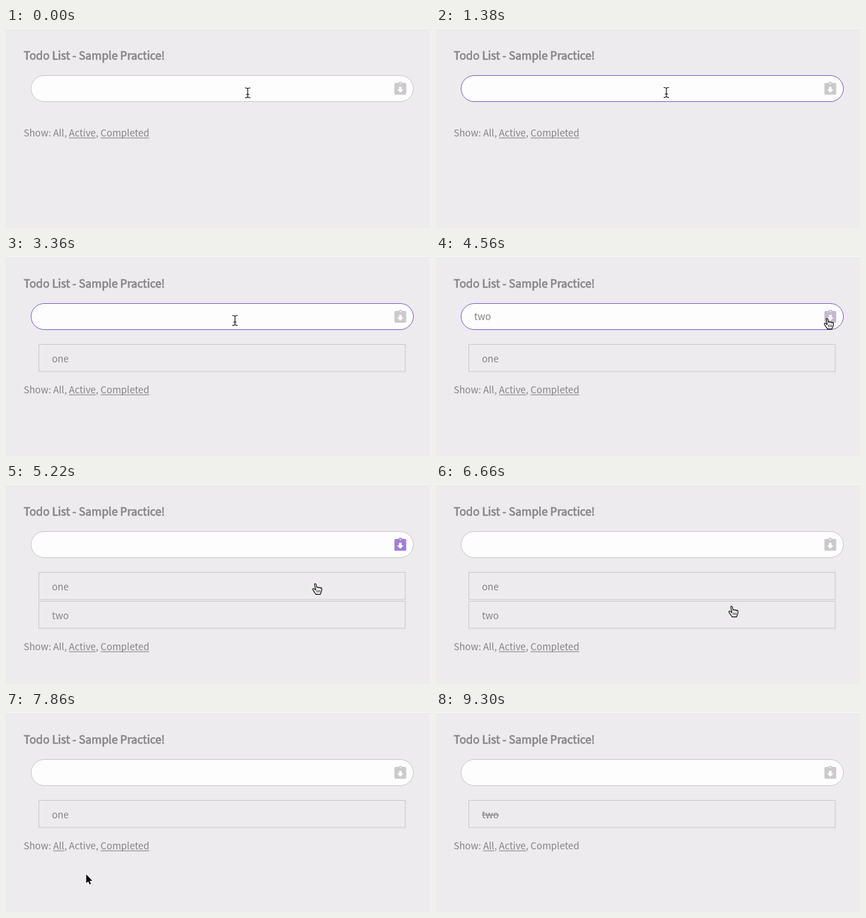
Recreate the animation shown at these times as an HTML page with a canvas. Size 600 px wide and 284 px high, loop 9660 ms.

```html
<!DOCTYPE html>
<html lang="en">
<head>
<meta charset="utf-8">
<title>Todo List</title>
<style>
  html, body { margin: 0; width: 100%; height: 100%; overflow: hidden; background: #edebee; }
  canvas { display: block; width: 600px; height: 284px; }
</style>
</head>
<body>
<canvas id="stage" role="img" aria-label="Todo list demo"></canvas>
<script>
const LOOP = 9660, STEP = 60;
const canvas = document.getElementById('stage');
const ctx = canvas.getContext('2d');
const ratio = window.devicePixelRatio || 1;
canvas.width = 600 * ratio;
canvas.height = 284 * ratio;

const FAMILY = '"Noto Sans CJK SC", "Noto Sans CJK JP", "Noto Sans CJK", "Noto Sans", sans-serif';
const BODY = '13.4px ' + FAMILY;
const TITLE = '15.55px ' + FAMILY;
const INK = '#858385', LINE = [203, 201, 204], PURPLE = [138, 100, 200];
const ICON_OFF = [203, 201, 205], ICON_ON = [160, 128, 210];
const ROW = 41;

const iconPath = new Path2D('M19 3h-4.18C14.4 1.84 13.3 1 12 1c-1.3 0-2.4.84-2.82 2H5c-1.1 0-2 .9-2 2v14c0 1.1.9 2 2 2h14c1.1 0 2-.9 2-2V5c0-1.1-.9-2-2-2zm-7 0c.55 0 1 .45 1 1s-.45 1-1 1-1-.45-1-1 .45-1 1-1zm0 15l-5-5h3V9h4v4h3l-5 5z');
const arrowPath = new Path2D('M0 0V12.6L2.9 10L4.7 14.3L6.7 13.4L4.9 9.3H8.7Z');
const handPath = new Path2D('M4.4 9.6L3 8.2C1.8 7 .2 7.5 .6 8.8C1 10 2.2 11.2 2.9 12.6C3.6 13.8 4.7 14.2 4.7 15.6H11.4C11.5 14 13.3 12.2 13.3 9.6V7.6C13.3 6.1 11.4 6.1 11.2 7.1C11 5.6 9 5.5 8.8 6.5C8.5 5.2 6.6 5.1 6.4 6.2L5.3 1.7C4.9 .1 2.9 .3 3.1 1.9L4.6 8.6');
const beamPath = new Path2D('M-3.4 -7Q-.4 -7 0 -5.6Q.4 -7 3.4 -7M0 -5.6V5.6M-3.4 7Q-.4 7 0 5.6Q.4 7 3.4 7M-1.8 2.2H1.8');

// Pointer track: time, x, y of the hotspot
const track = [
  [0, 342, 92], [60, 334, 92], [120, 326, 91.5], [2880, 326, 91.5],
  [3000, 335, 84], [3180, 331, 98], [3360, 324, 91.5], [4260, 324, 91.5],
  [4320, 340, 92], [4500, 540, 90], [4560, 552.5, 89], [4860, 552.5, 89],
  [5220, 437, 142], [5280, 422, 155], [6600, 422, 155], [6660, 417.5, 174],
  [6780, 419, 193], [7260, 419, 193], [7680, 113, 230], [8100, 113, 230],
  [8220, 150, 208], [8280, 168, 195.5], [9180, 168, 195.5], [9240, 172, 169]
];
const hidden = [[1740, 2880], [3600, 4320], [9300, LOOP]];
const caretOn = [[1020, 1380], [1680, 2220], [2400, 2700], [2940, 3300], [3600, 4320], [4620, 4740]];
const typing = [[1740, 'o'], [1860, 'on'], [1920, 'one'], [2400, ''],
                [3600, 't'], [3900, 'tw'], [3960, 'two'], [4800, '']];

const within = (spans, t) => spans.some(([a, b]) => t >= a && t < b);
const ramp = (t, a, b) => Math.min(1, Math.max(0, (t - a) / (b - a)));
const mix = (a, b, k) => `rgb(${a.map((v, i) => Math.round(v + (b[i] - v) * k)).join(',')})`;
const inside = (p, x, y, w, h) => p.x >= x && p.x <= x + w && p.y >= y && p.y <= y + h;

function pointerAt(t) {
  const i = track.findIndex(k => k[0] > t);
  if (i < 0) return { x: track.at(-1)[1], y: track.at(-1)[2] };
  const [t0, x0, y0] = track[i - 1], [t1, x1, y1] = track[i];
  const k = (t - t0) / (t1 - t0);
  return { x: x0 + (x1 - x0) * k, y: y0 + (y1 - y0) * k };
}

function stateAt(t) {
  const one = { text: 'one', done: t >= 5460 && t < 6360 };
  const two = { text: 'two', done: t >= 6960 };
  let items = [];
  if (t >= 8580) items = [two];
  else if (t >= 7800) items = [one];
  else if (t >= 4800) items = [one, two];
  else if (t >= 2400) items = [one];
  const typed = typing.filter(k => k[0] <= t).pop();
  return {
    items,
    filter: t >= 8580 ? 'Completed' : t >= 7800 ? 'Active' : 'All',
    value: typed ? typed[1] : '',
    focus: ramp(t, 960, 1080) - ramp(t, 4740, 4860),
    icon: ramp(t, 4500, 4800) - ramp(t, 5280, 5700)
  };
}

function label(str, x, y) {
  ctx.font = BODY;
  ctx.fillStyle = INK;
  ctx.fillText(str, x, y);
  return ctx.measureText(str).width;
}

function drawTitle() {
  const text = 'Todo List - Sample Practice!';
  ctx.font = TITLE;
  ctx.fillStyle = ctx.strokeStyle = INK;
  ctx.lineWidth = 0.6;
  ctx.fillText(text, 25, 45);
  ctx.strokeText(text, 25, 45);
}

function drawInput(s, t) {
  ctx.beginPath();
  ctx.roundRect(35.5, 67.5, 541, 37, 18.5);
  ctx.fillStyle = '#fefdfe';
  ctx.fill();
  ctx.lineWidth = 1;
  ctx.strokeStyle = mix(LINE, PURPLE, s.focus);
  ctx.stroke();

  const w = label(s.value, 54, 91);
  if (within(caretOn, t)) {
    ctx.fillStyle = '#8d7bb5';
    ctx.fillRect(54 + Math.round(w), 77, 1, 18);
  }

  ctx.save();
  ctx.translate(546.8, 75.2);
  ctx.scale(0.933, 0.933);
  ctx.fillStyle = mix(ICON_OFF, ICON_ON, s.icon);
  ctx.fill(iconPath);
  ctx.restore();
}

function drawItems(items) {
  items.forEach((item, i) => {
    const y = 125.5 + i * ROW;
    ctx.lineWidth = 1;
    ctx.strokeStyle = mix(LINE, LINE, 0);
    ctx.strokeRect(46.5, y, 518.5, 38.5);
    const w = label(item.text, 65, y + 25);
    if (item.done) ctx.fillRect(65, y + 20, w, 1.2);
  });
}

// Draws the filter row and returns the area of each word
function drawFilters(s) {
  const y = 154.4 + s.items.length * ROW;
  const areas = [];
  let x = 25 + label('Show: ', 25, y);
  ['All', 'Active', 'Completed'].forEach((name, i) => {
    const w = label(name, x, y);
    const link = name !== s.filter;
    if (link) ctx.fillRect(x, Math.round(y) + 1.6, w, 1);
    areas.push({ x, y: y - 14, w, link });
    x += w;
    if (i < 2) x += label(', ', x, y);
  });
  return areas;
}

function cursorKind(p, s, areas) {
  if (inside(p, 547, 74, 22, 23)) return 'hand';
  if (inside(p, 35, 67, 541, 38)) return 'beam';
  if (s.items.some((_, i) => inside(p, 46, 125 + i * ROW, 520, 40))) return 'hand';
  const word = areas.find(a => inside(p, a.x, a.y, a.w, 18));
  return word ? (word.link ? 'hand' : 'beam') : 'arrow';
}

function drawCursor(p, kind) {
  ctx.save();
  ctx.lineJoin = ctx.lineCap = 'round';
  if (kind === 'hand') {
    ctx.translate(p.x - 3.5, p.y - 1);
    ctx.fillStyle = '#fff';
    ctx.strokeStyle = '#111';
    ctx.lineWidth = 1.1;
    ctx.fill(handPath);
    ctx.stroke(handPath);
    ctx.lineWidth = 0.8;
    ctx.beginPath();
    for (const x of [6.5, 8.6, 10.7]) {
      ctx.moveTo(x, 9.8);
      ctx.lineTo(x, 12.8);
    }
    ctx.stroke();
  } else if (kind === 'beam') {
    ctx.translate(p.x, p.y);
    ctx.strokeStyle = '#fff';
    ctx.lineWidth = 2.2;
    ctx.stroke(beamPath);
    ctx.strokeStyle = '#111';
    ctx.lineWidth = 1.1;
    ctx.stroke(beamPath);
  } else {
    ctx.translate(p.x + 0.5, p.y + 0.5);
    ctx.strokeStyle = '#fff';
    ctx.lineWidth = 1.8;
    ctx.stroke(arrowPath);
    ctx.fillStyle = '#000';
    ctx.fill(arrowPath);
  }
  ctx.restore();
}

function draw(t) {
  ctx.setTransform(ratio, 0, 0, ratio, 0, 0);
  ctx.fillStyle = '#edebee';
  ctx.fillRect(0, 0, 600, 284);
  ctx.fillStyle = '#f9f8f9';
  ctx.fillRect(0, 0, 600, 1);

  const s = stateAt(t);
  drawTitle();
  drawInput(s, t);
  drawItems(s.items);
  const areas = drawFilters(s);
  if (!within(hidden, t)) {
    const p = pointerAt(t);
    drawCursor(p, cursorKind(p, s, areas));
  }
}

const start = performance.now();
function tick() {
  const t = (performance.now() - start) % LOOP;
  draw(Math.floor(t / STEP) * STEP);
  requestAnimationFrame(tick);
}
tick();
</script>
</body>
</html>
```
